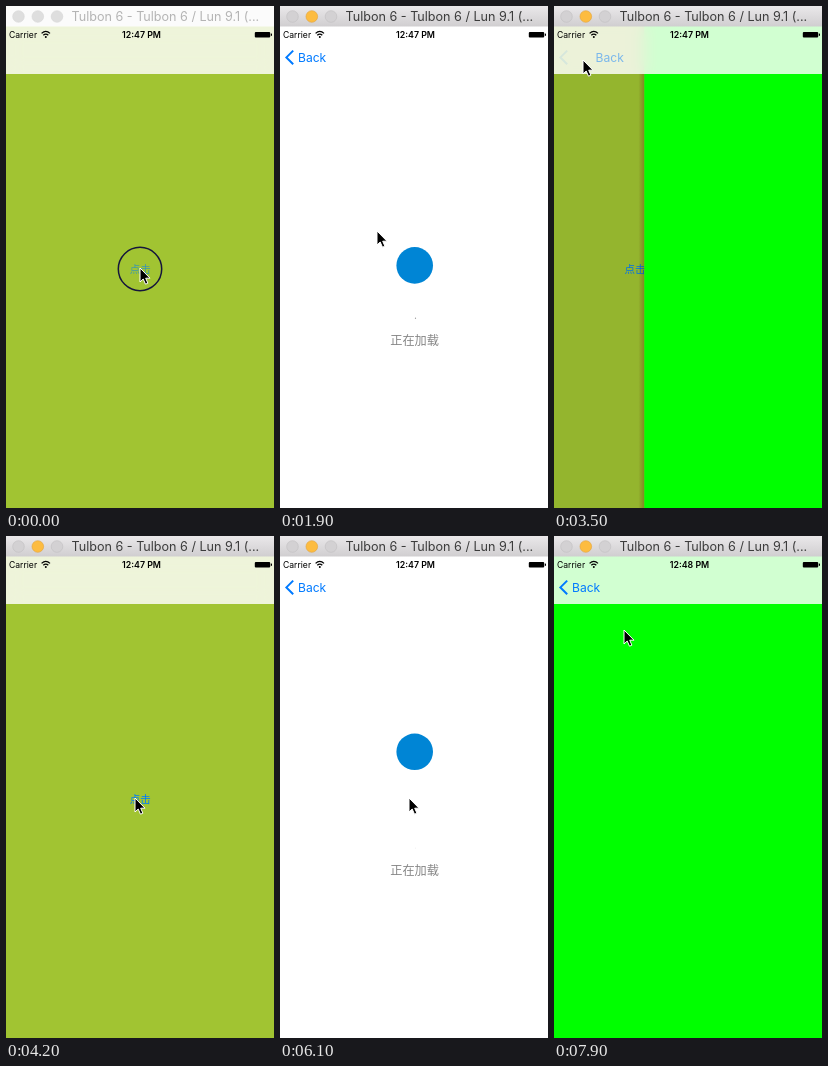
These frames come from a looping animation (268x502 px, 8000 ms). An HTML page:

```html
<!DOCTYPE html>
<html lang="en">
<head>
<meta charset="utf-8">
<title>Loading view</title>
<style>
  html, body { margin: 0; width: 268px; height: 502px; overflow: hidden; background: #fff; }
  svg, #bar { position: absolute; left: 0; top: 0; display: block; }
  #bar { top: 20px; width: 268px; height: 47.5px; backdrop-filter: blur(8px); }
  text { font-family: Inter, "Open Sans", sans-serif; }
  .cjk { font-family: "Noto Sans CJK SC", "Noto Sans CJK", sans-serif; text-anchor: middle; }
  .title { font-size: 12.6px; fill: #3c3c3c; }
  .idle .title { fill: #b4b4b4; }
  .frame { fill: url(#metal); }
  .idle .frame { fill: #fbfbfb; }
  .dot { fill: #d3d1d3; stroke: #c0bec0; stroke-width: .6; }
  .dot.min { fill: #fdbc40; stroke: #e2a136; }
  .idle .dot { fill: #dedede; stroke: #d6d6d6; }
  .blue { fill: #007aff; }
</style>
</head>
<body>
<svg width="268" height="502">
  <defs>
    <linearGradient id="edge">
      <stop offset="0" stop-color="#5a3010" stop-opacity="0"/>
      <stop offset="1" stop-color="#5a3010" stop-opacity=".5"/>
    </linearGradient>
  </defs>
  <g id="root">
    <rect y="20" width="268" height="482" fill="#a1c432"/>
    <text id="button" class="cjk blue" x="134.3" y="267" font-size="10.5">点击</text>
    <rect id="dim" y="20" width="268" height="482"/>
  </g>
  <g id="detail">
    <rect id="shade" x="-6" y="20" width="6" height="482" fill="url(#edge)"/>
    <rect y="20" width="268" height="482" fill="#0f0"/>
    <g id="loader">
      <rect y="20" width="268" height="482" fill="#fff"/>
      <g id="content">
        <ellipse id="shadow" cx="135.5" cy="312.3" ry=".8" fill="#999"/>
        <circle id="ball" cx="134.7" r="18.3" fill="#0085d5"/>
        <text class="cjk" x="134.6" y="339" font-size="12.2" fill="#868686">正在加载</text>
      </g>
    </g>
  </g>
</svg>
<div id="bar"></div>
<svg id="chrome" width="268" height="502">
  <defs>
    <linearGradient id="metal" x2="0" y2="1">
      <stop offset="0" stop-color="#eae8ea"/>
      <stop offset="1" stop-color="#d0ced0"/>
    </linearGradient>
  </defs>
  <rect class="frame" width="268" height="20.5"/>
  <circle class="dot" cx="12.5" cy="10.5" r="5.8"/>
  <circle class="dot min" cx="31.8" cy="10.5" r="5.8"/>
  <circle class="dot" cx="51" cy="10.5" r="5.8"/>
  <text class="title" x="65.5" y="15">Tulbon 6 - Tulbon 6 / Lun 9.1 (...</text>

  <text x="3" y="31.6" font-size="8.6">Carrier</text>
  <g fill="none" stroke="#000" stroke-width="1.3">
    <path d="M35.6 27.4Q39.8 23.4 44 27.4M37.3 29.3Q39.8 27 42.3 29.3"/>
  </g>
  <circle cx="39.8" cy="31" r="1"/>
  <text id="clock" x="135.5" y="31.6" font-size="8.8" font-weight="600" text-anchor="middle"></text>
  <rect x="248.8" y="26" width="15.4" height="5.4" rx="1"/>
  <rect x="264.8" y="27.6" width="1.2" height="2.2"/>

  <path id="chevron" d="M13.2 44.6L6.4 51.4L13.2 58.2" fill="none" stroke="#007aff" stroke-width="2"/>
  <text id="back" class="blue" y="56" font-size="12.1">Back</text>

  <circle id="ring" r="21.7" fill="none" stroke="#15153c" stroke-width="1.5"/>
  <path id="cursor" d="M0 0V14L3.2 11L5.5 16.2L7.9 15.2L5.7 10.2H10Z" stroke="#fff" stroke-width="1" stroke-linejoin="round"/>
</svg>
<script>
  const LOOP = 8000, WIDTH = 268;
  const PUSH_1 = 340, POP = 3437, PUSH_2 = 4710, SLIDE = 500;
  const FADE_1 = 2415, FADE_2 = 6805, FADE = 500;
  const BOUNCE = 970, TOP_1 = 1510, TOP_2 = 5265;

  // time, x, y of the pointer tip
  const path = [
    [0, 134, 262], [1350, 134, 262], [1900, 97, 225], [2650, 27, 78], [2800, 25, 72],
    [3250, 29, 54], [3550, 29, 54], [4200, 129, 262], [7200, 129, 262], [7900, 70, 94]
  ];
  const clicks = [[0, 150], [3270, 3420], [4450, 4620]];

  const el = {};
  document.querySelectorAll('[id]').forEach(n => el[n.id] = n);
  const set = (id, name, value) => el[id].setAttribute(name, value);
  const move = (id, x, y = 0) => set(id, 'transform', `translate(${x} ${y})`);
  const clamp = v => Math.min(1, Math.max(0, v));
  const easeOut = v => 1 - (1 - clamp(v)) ** 3;
  const smooth = v => (v = clamp(v), v * v * (3 - 2 * v));

  function pointer(t) {
    const i = path.findIndex(p => p[0] > t);
    if (i < 0) return path[path.length - 1].slice(1);
    const [t0, x0, y0] = path[i - 1], [t1, x1, y1] = path[i];
    const k = smooth((t - t0) / (t1 - t0));
    return [x0 + (x1 - x0) * k, y0 + (y1 - y0) * k];
  }

  // 0 shows the first page, 1 the second
  function pushed(t) {
    if (t < POP) return easeOut((t - PUSH_1) / SLIDE);
    if (t < PUSH_2) return 1 - easeOut((t - POP) / SLIDE);
    return easeOut((t - PUSH_2) / SLIDE);
  }

  function drawLoader(t) {
    const first = t < PUSH_2;
    const left = 1 - smooth((t - (first ? FADE_1 : FADE_2)) / FADE);
    const turns = (t - (first ? TOP_1 : TOP_2)) / BOUNCE;
    const phase = 2 * (turns - Math.round(turns));
    const fall = Math.abs(phase);
    set('ball', 'cy', 210 + 76 * fall * fall);
    set('shadow', 'rx', 8 * fall ** (phase < 0 ? 4 : 12));
    set('loader', 'opacity', left);
    set('content', 'transform', `translate(134 262) scale(${.8 + .2 * left}) translate(-134 -262)`);
    const fading = left > 0 && left < 1;
    el.bar.style.background = `rgba(255,255,255,${fading ? .62 : .82})`;
  }

  function drawPages(t) {
    const p = pushed(t), popping = t >= POP && t < PUSH_2;
    move('root', -.3 * WIDTH * p);
    set('dim', 'opacity', .12 * p);
    move('detail', WIDTH * (1 - p));
    set('detail', 'visibility', p > 0 ? 'visible' : 'hidden');
    set('shade', 'opacity', popping ? p : 0);
    set('button', 'opacity', t < 200 ? .6 : 1);
    set('chevron', 'opacity', clamp((p - .6) / .4) ** 1.3);
    set('back', 'x', 18 + 70 * (1 - p));
    set('back', 'opacity', popping ? clamp((p - .35) / .65) : clamp((p - .7) / .3) ** 2);
  }

  function draw(t) {
    drawPages(t);
    drawLoader(t);
    const [x, y] = pointer(t);
    move('cursor', x, y);
    move('ring', x, y + 1);
    const down = clicks.some(([a, b]) => t >= a && t < b);
    set('ring', 'visibility', down ? 'visible' : 'hidden');
    el.chrome.classList.toggle('idle', t < 100);
    el.clock.textContent = t < 7400 ? '12:47 PM' : '12:48 PM';
  }

  const start = performance.now();
  function tick() {
    draw((performance.now() - start) % LOOP);
    requestAnimationFrame(tick);
  }
  tick();
</script>
</body>
</html>
```
